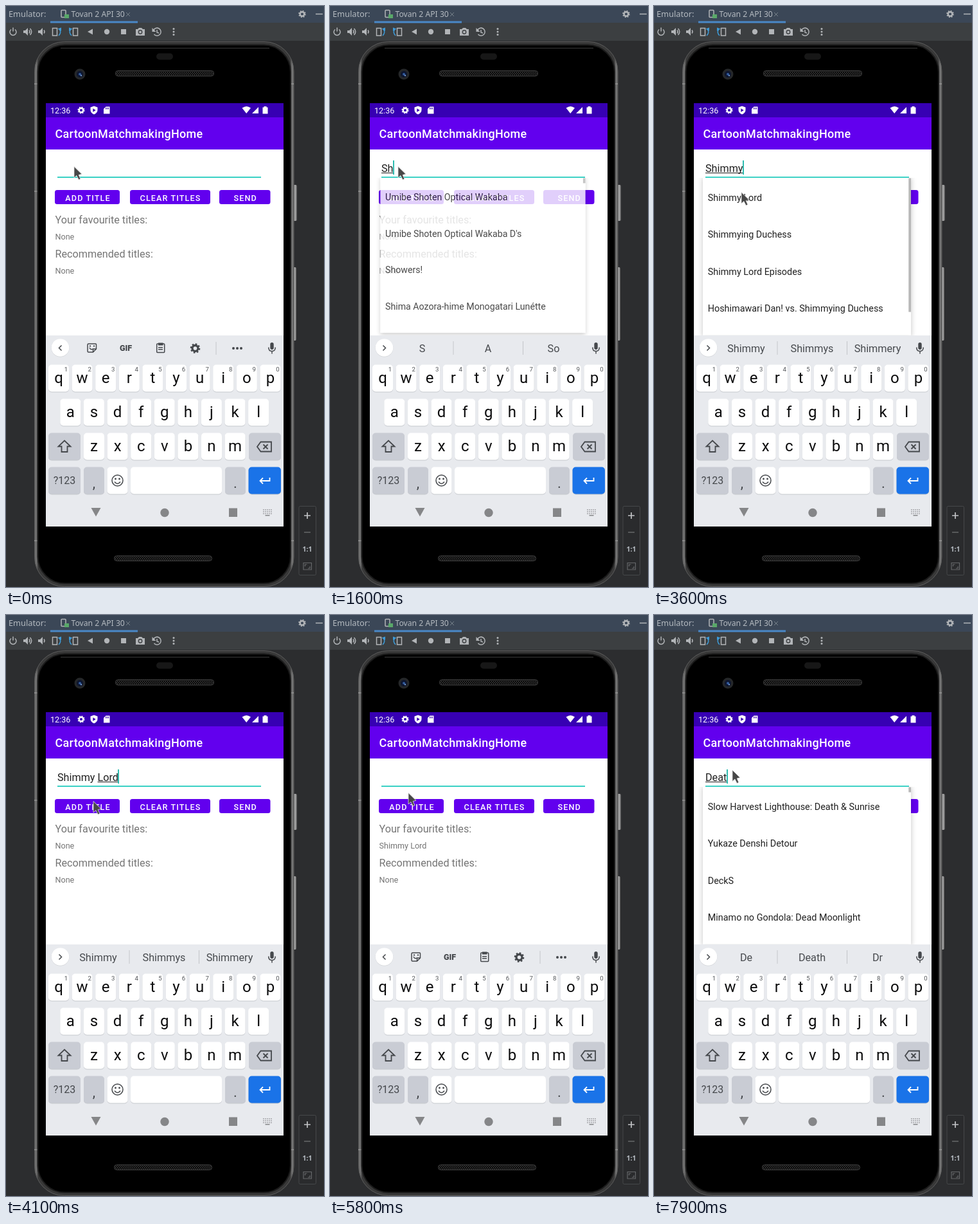
Write an HTML page that moves like this. It is 495 by 903 pixels and loops after 8000 ms.

```html
<!DOCTYPE html>
<html lang="en">
<head>
<meta charset="utf-8">
<title>Emulator</title>
<style>
  html, body { margin: 0; width: 100%; height: 100%; overflow: hidden; background: #2c2d2f; }
  svg { display: block; font-family: Roboto, sans-serif; }
  text { white-space: pre; }
  .ide { font: 12.8px "Noto Sans", "Open Sans", sans-serif; fill: #b4bac0; }
  .mid { text-anchor: middle; }
  .line { fill: none; stroke: currentColor; stroke-width: 1.5; }
  .ico { color: #b2b5b8; fill: #b2b5b8; }
  .blue { color: #3d9bd8; fill: #3d9bd8; }
  .kbd { color: #45484c; fill: #45484c; }
  .white { color: #fff; fill: #fff; }
  .bold { stroke-width: 1.8; }
  .btn { font-size: 12.6px; font-weight: 500; letter-spacing: 1.12px; fill: #fff; text-anchor: middle; }
  .head { font-size: 16.2px; fill: #757575; }
  .body { font-size: 12.6px; fill: #757575; }
  .row { font-size: 14.4px; fill: #212121; }
  .word { font-size: 16.2px; fill: #484b4f; text-anchor: middle; }
  .letter { font-size: 24px; fill: #0c0c0d; text-anchor: middle; }
  .digit { font-size: 9.6px; fill: #505357; text-anchor: middle; }
</style>
</head>
<body>
<svg width="495" height="903" viewBox="0 0 495 903">
  <defs>
    <pattern id="mesh" width="3" height="4" patternUnits="userSpaceOnUse">
      <circle cx="1" cy="1" r=".8" fill="#606060"/><circle cx="2.5" cy="3" r=".8" fill="#606060"/>
    </pattern>
    <linearGradient id="rim" x2="1" y2="0">
      <stop offset="0" stop-color="#5a5a5a"/><stop offset=".006" stop-color="#7a7a7a"/><stop offset=".014" stop-color="#383838"/>
      <stop offset=".986" stop-color="#383838"/><stop offset=".994" stop-color="#7a7a7a"/><stop offset="1" stop-color="#5a5a5a"/>
    </linearGradient>
    <linearGradient id="side" x2="1" y2="0">
      <stop offset="0" stop-color="#444"/><stop offset=".6" stop-color="#b0b0b0"/><stop offset="1" stop-color="#555"/>
    </linearGradient>
    <radialGradient id="glow"><stop offset=".3" stop-color="#fff"/><stop offset="1" stop-color="#fff" stop-opacity="0"/></radialGradient>
    <filter id="soft" x="-10%" y="-10%" width="120%" height="125%">
      <feDropShadow dx="0" dy="3" stdDeviation="4" flood-opacity=".24"/>
    </filter>
    <clipPath id="content"><rect x="62" y="267" width="370" height="245"/></clipPath>
    <clipPath id="addClip"><rect x="76" y="286" width="101" height="22" rx="3.5"/></clipPath>
    <g id="gear" fill="none" stroke="currentColor">
      <circle r="3.8" stroke-width="2.8"/><circle r="5.6" stroke-width="2" stroke-dasharray="2.2"/>
    </g>
    <g id="speaker"><path d="M-6-2h3l4-4v12l-4-4h-3z"/><path class="line" d="M3-2.5q2 2.5 0 5"/></g>
    <g id="rotate">
      <rect class="line" x="-6.5" y="-5.5" width="7" height="11.5"/>
      <g class="blue"><path class="line" d="M4-4q4 5-1 10"/><path d="M1.5-4.500l5.500-2v5.500z"/></g>
    </g>
    <g id="mic">
      <rect x="-2.7" y="-8.5" width="5.4" height="11" rx="2.7"/>
      <path class="line" d="M-5.3-1q0 6 5.3 6t5.3-6M0 5v4"/>
    </g>
  </defs>

  <!-- window -->
  <rect width="495" height="26" fill="#3b4757"/>
  <rect y="26" width="495" height="28" fill="#3c3f41"/>
  <rect x="69" y="23.5" width="136" height="3" fill="#4a88c7"/>
  <text class="ide" x="4" y="17">Emulator:</text>
  <text class="ide" x="101.5" y="17" style="font-size:12.2px">Tovan 2 API 30</text>
  <path d="M187 10l6 6m0-6l-6 6" stroke="#75808a"/>
  <g class="ico">
    <rect class="line" x="86" y="6.5" width="7" height="11" rx="1"/>
    <rect x="91" y="13" width="7" height="6" fill="#59a869"/>
    <use href="#gear" transform="translate(461 12.5) scale(.88)"/>
    <path class="line" d="M482 12.5h11"/>
    <path class="line" d="M8 36.5a5 5 0 1 0 6 0M11 33.5v6"/>
    <use href="#speaker" x="33" y="40"/><path class="line" d="M37.5 35q4.5 5 0 10"/>
    <use href="#speaker" x="56" y="40"/>
    <use href="#rotate" x="79" y="40"/>
    <use href="#rotate" transform="translate(105 40) scale(-1 1)"/>
    <path d="M127 40l8-4.5v9z"/><circle cx="157" cy="40" r="4.2"/><rect x="179" y="36" width="8" height="8"/>
    <path d="M202 36h3l2-2h4l2 2h3v10h-14z"/>
    <circle cx="209" cy="40.5" r="2.7" fill="none" stroke="#3c3f41" stroke-width="1.4"/>
    <path class="line" d="M229.5 38a6 6 0 1 1 1 6M235 37v4l3 1"/><path d="M227.5 34v6h6z"/>
    <circle cx="261" cy="35.5" r="1.5"/><circle cx="261" cy="40" r="1.5"/><circle cx="261" cy="44.5" r="1.5"/>
  </g>

  <!-- phone -->
  <rect x="446" y="278" width="7" height="56" rx="2" fill="url(#side)"/>
  <rect x="446" y="406" width="6" height="114" rx="2" fill="url(#side)"/>
  <rect x="44.5" y="55.5" width="403.5" height="847" rx="46" fill="url(#rim)" stroke="#5c5c5c"/>
  <path fill="#8a8a8a" d="M44 120h6v2h-6zM44 287h6v2h-6zM443 120h5v2h-5zM443 830h5v2h-5zM44 830h6v2h-6z"/>
  <rect x="49.5" y="60.5" width="393.5" height="837" rx="42" stroke="#1c1c1c" stroke-width="2"/>
  <path d="M85 65.5H410" stroke="#3b3b3b"/>
  <rect x="234" y="73.5" width="26" height="10" rx="5" fill="#171717"/>
  <circle cx="115" cy="106" r="8.5" fill="#252729"/><circle cx="115" cy="106" r="5" fill="#0d1630"/>
  <circle cx="115" cy="106" r="2" fill="#315a9c"/><circle cx="117" cy="108" r="1.2" fill="#6f93c4"/>
  <g fill="url(#mesh)" stroke="#3d3d3d">
    <rect x="170.5" y="100.5" width="153" height="8.5" rx="4"/>
    <rect x="168.5" y="854.5" width="152" height="8" rx="4"/>
  </g>

  <!-- app -->
  <rect x="62" y="151" width="370" height="658" fill="#fff"/>
  <rect x="62" y="151" width="370" height="22" fill="#3700b3"/>
  <rect x="62" y="173" width="370" height="50" fill="#6200ee"/>
  <g class="white">
    <text x="69" y="166.5" font-size="12.6">12:36</text>
    <use href="#gear" transform="translate(117 162) scale(.85)"/>
    <path d="M137 155.5l5.5 2v4q0 4.5-5.5 7-5.5-2.5-5.5-7v-4z"/>
    <path d="M135.3 159.3l4.4 2.7-4.4 2.7z" fill="#3700b3"/>
    <path d="M155.5 156.5h6v11h-9.5v-7.500z"/>
    <path d="M155.5 158v2.5m2-2.5v2.5m2-2.5v2.5" stroke="#3700b3"/>
    <path d="M367.5 158.5q7-5 13.500 0l-6.8 8.5zM383 167h10v-10zM399.5 157.5h2v-1.500h4v1.500h2v10h-8z"/>
    <text x="76.5" y="205" font-size="18" font-weight="500" letter-spacing=".3">CartoonMatchmakingHome</text>
  </g>
  <text id="field" x="80" y="258" font-size="16.2" fill="#202020"></text>
  <rect id="compose" y="259" height="1" fill="#202020"/>
  <rect id="caret" y="240" width="2" height="22" fill="#2fbcb0"/>
  <rect x="80" y="265.3" width="317" height="1.8" fill="#1fcabd"/>
  <g fill="#6200ee">
    <rect x="76" y="286" width="101" height="22" rx="3.5"/>
    <rect x="193" y="286" width="125" height="22" rx="3.5"/>
    <rect x="332" y="286" width="79.5" height="22" rx="3.5"/>
  </g>
  <g clip-path="url(#addClip)"><circle id="ripple" cx="122" cy="300" fill="url(#glow)"/></g>
  <text class="btn" x="127.5" y="303">ADD TITLE</text>
  <text class="btn" x="256" y="303">CLEAR TITLES</text>
  <text class="btn" x="372.7" y="303">SEND</text>
  <text class="head" x="76.5" y="337.5">Your favourite titles:</text>
  <text class="body" x="76.5" y="363" id="fav">None</text>
  <text class="head" x="76.5" y="391">Recommended titles:</text>
  <text class="body" x="76.5" y="416">None</text>

  <g clip-path="url(#content)">
    <g id="popup">
      <rect x="76" y="264" width="324" height="247.5" fill="#fff" filter="url(#soft)"/>
      <rect id="press" x="76" y="267" width="324" height="59" opacity=".1"/>
      <g id="rows"></g>
      <rect id="bar" x="396.3" y="267.5" width="3.7" fill="#b8b8b8"/>
    </g>
  </g>

  <!-- keyboard -->
  <rect x="62" y="512" width="370" height="297" fill="#e8eaee"/>
  <g class="kbd">
    <circle cx="84.5" cy="531.5" r="14" fill="#d2d4d8"/><circle cx="84.5" cy="531" r="13.8" fill="#fff"/>
    <path id="chevron" class="line" d="M-2-4l4 4-4 4"/>
    <use href="#mic" x="414" y="531.5"/>
    <g id="tools">
      <path class="line" d="M128.5 525h11q1 0 1 1v7l-5 5h-7q-1.5 0-1.5-1.500v-10q0-1.500 1.500-1.500zM135.5 538v-5h5M130 531q2 4 5 2"/>
      <path d="M130 527.5h2v2h-2zM136 527.5h2v2h-2z"/>
      <text class="mid" x="186.5" y="536" font-size="12.5" font-weight="900">GIF</text>
      <rect class="line" x="234.7" y="525" width="12" height="13.5" rx="1"/>
      <path d="M237 523.5h7.500v4h-7.500zM237 530h7v1.400h-7zM237 533h7v1.400h-7z"/>
      <use href="#gear" transform="translate(294.5 532) scale(1.18)"/>
      <path d="M326.5 522h1v20h-1z" fill="#c4c6ca"/>
      <circle cx="354" cy="532" r="2"/><circle cx="360" cy="532" r="2"/><circle cx="366" cy="532" r="2"/>
    </g>
    <g id="strip">
      <path d="M191.5 521h1v21h-1zM300 521h1v21h-1z" fill="#c4c6ca"/>
      <text class="word" x="143.5" y="538"></text><text class="word" x="246" y="538"></text><text class="word" x="348" y="538"></text>
      <g id="crown">
        <path d="M340 527l4.5 4 4-8 4 8 4.5-4-2 13h-13z" fill="#f8b92c"/>
        <path d="M342 536q6.5 3 13 0v3.500q-6.5 2-13 0z" fill="#dd8b1b"/>
        <circle cx="348.5" cy="535" r="2" fill="#d84335"/><circle cx="343.5" cy="535" r="1.2" fill="#4a90d9"/><circle cx="353.5" cy="535" r="1.2" fill="#4a90d9"/>
      </g>
    </g>
  </g>
  <g id="keys"></g>
  <g class="kbd">
    <path class="line bold" d="M91 675.5l9.5 9h-5v8.500h-9v-8.500h-5z"/>
    <path class="line bold" d="M396.5 677.5h16.500v15h-16.500l-5.500-7.500zM400.5 681.5l7 7m0-7l-7 7"/>
    <text class="mid" x="91" y="743" font-size="16">?123</text>
    <text class="mid" x="137" y="749" font-size="22">,</text>
    <text class="mid" x="357" y="749" font-size="22">.</text>
    <circle class="line" cx="173.5" cy="737.5" r="8.5"/>
    <path class="line" d="M169 739.5q4.5 6 9 0"/><circle cx="170.5" cy="735" r="1.4"/><circle cx="176.5" cy="735" r="1.4"/>
    <g class="white"><path class="line bold" d="M410.5 733v5h-15m4.500-4.500l-4.500 4.500 4.500 4.500"/></g>
  </g>
  <g fill="#858688">
    <path d="M132.5 780h15l-7.500 13.500z"/><circle cx="247" cy="787.5" r="6.7"/><rect x="347" y="780.5" width="13" height="13.5"/>
    <path d="M400 783h14m-14 3h14m-14 3h14" stroke="#9a9b9e" stroke-width="1.5" stroke-dasharray="1.7 1.3"/><path d="M403.5 791h7v1.500h-7z"/>
  </g>

  <!-- zoom -->
  <rect x="456" y="777.5" width="26.5" height="107" rx="2" fill="#2a2b2d" stroke="#46484a"/>
  <path d="M464 792h10m-5-5v10" stroke="#c2c4c6" stroke-width="1.7"/>
  <path d="M464 818h10" stroke="#66686a" stroke-width="1.5"/>
  <text class="ide mid" x="469" y="848" style="font-size:10.5px;font-weight:700">1:1</text>
  <path fill="none" stroke="#66686a" stroke-width="1.2" d="M463 865.5h12.500v10.500h-12.500zM465.5 871v-3h3m4.500 3v3h-3"/>

  <path id="pointer" d="M0 0V17.500L3.900 14L7.200 20.500L9.900 19.300L7.200 13L12 11.800Z" fill="#474747" stroke="#e4e4e4" stroke-width=".8"/>
</svg>

<script>
const LOOP = 8000, STEP = 100;
const $ = id => document.getElementById(id);
const add = (parent, tag, attrs, text = '') => {
  const el = document.createElementNS('http://www.w3.org/2000/svg', tag);
  for (const k in attrs) el.setAttribute(k, attrs[k]);
  el.textContent = text;
  return parent.appendChild(el);
};
const set = (id, attrs) => { for (const k in attrs) $(id).setAttribute(k, attrs[k]); };
const show = (id, on) => $(id).setAttribute('visibility', on ? 'inherit' : 'hidden');

// Keyboard
const key = (x, y, w, fill) => {
  add($('keys'), 'rect', { x, y: y + 1, width: w, height: 42, rx: 5, fill: '#c6c9ce' });
  add($('keys'), 'rect', { x, y, width: w, height: 42, rx: 5, fill });
};
const letters = [];
['qwertyuiop', 'asdfghjkl', 'zxcvbnm'].forEach((line, r) => {
  const first = [82, 100.3, 137][r], y = 557.5 + r * 53;
  [...line].forEach((c, i) => {
    const x = first + i * 36.6;
    key(x - 16, y, 32, '#fff');
    letters.push(add($('keys'), 'text', { class: 'letter', x, y: y + 28 }, c));
    if (!r) add($('keys'), 'text', { class: 'digit', x: x + 11.5, y: y + 10.5 }, (i + 1) % 10);
  });
});
const GREY = '#c9ccd4';
key(66, 663.5, 50, GREY); key(378, 663.5, 50, GREY);
key(66, 716.5, 50, GREY); key(121, 716.5, 32, GREY); key(157.5, 716.5, 32, '#fff');
key(194, 716.5, 142, '#fff'); key(341, 716.5, 32, GREY); key(377.5, 716.5, 50.5, '#1a73e8');

const rows = [302.5, 360, 417.5, 475].map(y => add($('rows'), 'text', { class: 'row', x: 83.7, y }));
const words = [...document.querySelectorAll('.word')];

// Drop-down contents: scrollbar height, then titles
const LISTS = {
  sh: [8, 'Umibe Shoten Optical Wakaba', "Umibe Shoten Optical Wakaba D's", 'Showers!', 'Shima Aozora-hime Monogatari Lunétte'],
  shim: [104, 'Shimmy Lord', 'Glasswork Carpenter: The Navigator of Shimmo..', 'Shimmying Duchess', 'Shimmy Lord Episodes'],
  shimmy: [208, 'Shimmy Lord', 'Shimmying Duchess', 'Shimmy Lord Episodes', 'Hoshimawari Dan! vs. Shimmying Duchess'],
  de: [8, 'Slow Harvest Lighthouse: Death & Sunrise', 'Yukaze Denshi Detour', 'DeckS', 'Minamo no Gondola: Dead Moonlight']
};

// Each entry changes part of the state from its time on
const START = { text: '', from: 0, caret: 0, caps: 0, strip: '', list: 'sh', alpha: 0, scale: 1, press: 0, fav: 'None' };
const EVENTS = [
  [500, { caret: 1 }],
  [1000, { caret: 0 }],
  [1100, { caps: 1 }],
  [1200, { text: 'S', caret: 1, caps: 0 }],
  [1300, { strip: 'S A So' }],
  [1600, { text: 'Sh', alpha: .81, scale: .985 }],
  [1700, { alpha: 1, scale: 1 }],
  [1800, { text: 'Shi', strip: 'Sh She Shop' }],
  [1900, { text: 'Shim' }],
  [2000, { text: 'Shimm', strip: 'Shi Ship Shirt', list: 'shim' }],
  [2100, { text: 'Shimmy', strip: 'Shim Shimmy Shimmer' }],
  [2300, { list: 'shimmy' }],
  [2400, { strip: 'Shimmy Shimmer Shimmers' }],
  [2700, { strip: 'Shimmy Shimmys Shimmery' }],
  [3100, { caret: 0 }],
  [3600, { caret: 1 }],
  [3800, { press: 1 }],
  [3900, { text: 'Shimmy Lord', from: 7, alpha: .7 }],
  [4000, { alpha: .25 }],
  [4100, { alpha: 0, press: 0 }],
  [4200, { strip: 'Lord Lords crown' }],
  [4900, { caret: 0 }],
  [5300, { text: '', from: 0, caret: 1, fav: 'Shimmy Lord' }],
  [5500, { strip: '' }],
  [5800, { caret: 0 }],
  [6300, { caret: 1 }],
  [6800, { caret: 0 }],
  [7100, { text: 'D', caret: 1 }],
  [7300, { strip: 'D Do Did' }],
  [7500, { text: 'De', list: 'de', alpha: .81, scale: .985 }],
  [7600, { alpha: 1, scale: 1 }],
  [7800, { text: 'Dea', strip: 'De Death Dr' }],
  [7900, { text: 'Deat' }]
];

const PATH = [[0, 106, 249.5], [2900, 106, 249.5], [3400, 136, 289.5], [4200, 136, 289.5],
  [4600, 122, 300], [5600, 122, 300], [6000, 122, 253], [6300, 122, 241], [LOOP, 122, 241]];
function pointerAt(t) {
  const i = PATH.findIndex(p => p[0] > t);
  const [t0, x0, y0] = PATH[i - 1], [t1, x1, y1] = PATH[i];
  const k = (t - t0) / (t1 - t0);
  return [x0 + (x1 - x0) * k, y0 + (y1 - y0) * k];
}

function render(t) {
  const s = { ...START };
  for (const [at, change] of EVENTS) if (at <= t) Object.assign(s, change);

  const field = $('field');
  field.textContent = s.text;
  const width = s.text ? field.getComputedTextLength() : 0;
  const skip = s.from ? field.getSubStringLength(0, s.from) : 0;
  set('compose', { x: 80 + skip, width: width - skip });
  set('caret', { x: Math.floor(80 + width) });
  show('caret', s.caret);
  $('fav').textContent = s.fav;

  const [bar, ...titles] = LISTS[s.list];
  rows.forEach((row, i) => row.textContent = titles[i]);
  set('bar', { height: bar });
  set('popup', { opacity: s.alpha, transform: `translate(238 267) scale(${s.scale}) translate(-238 -267)` });
  show('press', s.press);

  const parts = s.strip.split(' ');
  const crown = parts[2] === 'crown';
  words.forEach((w, i) => w.textContent = crown && i === 2 ? '' : parts[i] || '');
  show('strip', s.strip);
  show('crown', crown);
  show('tools', !s.strip);
  set('chevron', { transform: `translate(84.5 531.5) scale(${s.strip ? 1 : -1} 1)` });
  letters.forEach(l => l.textContent = s.caps ? l.textContent.toUpperCase() : l.textContent.toLowerCase());

  const age = (t - 5200) / 500;
  const live = age >= 0 && age < 1;
  set('ripple', { r: live ? 42 + age * 70 : 0, opacity: live ? .24 * (1 - age) : 0 });
  set('pointer', { transform: `translate(${pointerAt(t)})` });
}

const begin = performance.now();
let last = -1;
function tick() {
  const t = Math.floor((performance.now() - begin) % LOOP / STEP) * STEP;
  if (t !== last) render(last = t);
  requestAnimationFrame(tick);
}
tick();
</script>
</body>
</html>
```
